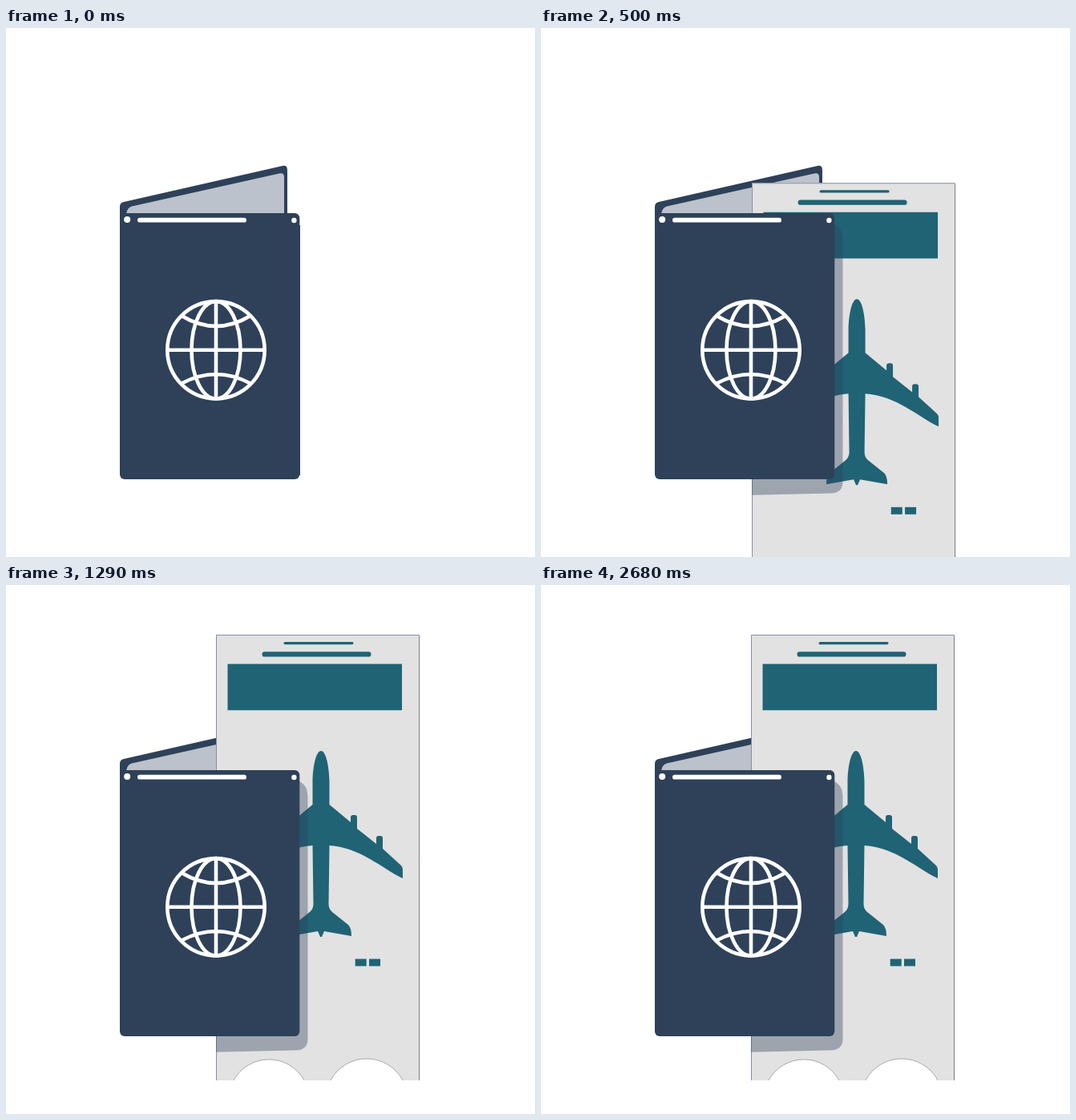
These frames come from a looping animation (660 px wide and 660 px high, 2720 ms). An HTML page with a canvas:

```html
<!DOCTYPE html>
<html lang="en">
<head>
<meta charset="utf-8">
<title>Passport and boarding pass</title>
<style>
  html, body { margin: 0; width: 100%; height: 100%; overflow: hidden; background: #fff; }
  canvas { display: block; width: 660px; height: 660px; }
</style>
</head>
<body>
<canvas id="stage" width="660" height="660"></canvas>
<script>
const ctx = document.getElementById('stage').getContext('2d');
const NAVY = '#2e4159', PAGE = '#bbc2cb', PAPER = '#e2e2e2', TEAL = '#206375';
const SHADOW = 'rgba(46,65,89,.38)';
const LOOP = 2720, STEP = LOOP / 76, LAST_MOVE = 18;

const fillPath = (d, color) => {
  ctx.fillStyle = color;
  ctx.fill(new Path2D(d));
};

const strokePath = (d, color, width) => {
  ctx.strokeStyle = color;
  ctx.lineWidth = width;
  ctx.stroke(new Path2D(d));
};

const box = (x, y, w, h, color, r = 0) => {
  ctx.fillStyle = color;
  ctx.beginPath();
  ctx.roundRect(x, y, w, h, r);
  ctx.fill();
};

const dot = (x, y, r, color) => {
  ctx.fillStyle = color;
  ctx.beginPath();
  ctx.arc(x, y, r, 0, Math.PI * 2);
  ctx.fill();
};

const ticketOutline = 'M262 62H516V618H495A51 51 0 0 0 405 618H372A50.2 50.2 0 0 0 284 618H262Z';

// Right half of the plane, measured from its centre line.
const halfPlane = 'M0 207C6 207 10 225 10.5 245V274L37 296V290Q37 287 40 287H42Q45 287 45 290V304' +
  'L69 323V316Q69 313 72 313H74Q77 313 77 316V329L100 350Q102 352 102 355V366' +
  'C75 353 50 328 10.5 325L9.5 398Q9.5 404 14 408L34 424Q38 428 38 438L4 432L1 439H0Z';

function drawBackCover() {
  fillPath('M142 240V223Q142 218 147 217L345 172Q351 171 351 177V240Z', NAVY);
  fillPath('M150 232Q151 224 157 222.5L341 181.5Q347 180 347 186V232Z', PAGE);
  box(365, 246, 2, 312, NAVY);
}

function drawPlane() {
  for (const side of [1, -1]) {
    ctx.save();
    ctx.translate(393, 0);
    ctx.scale(side, 1);
    fillPath(halfPlane, TEAL);
    ctx.restore();
  }
  box(392, 208, 2, 228, TEAL);
}

function drawTicket(dx, dy) {
  ctx.save();
  ctx.translate(dx, dy);
  fillPath(ticketOutline, PAPER);
  strokePath('M262.5 618V62.5H515.5', '#8390a6', 1);
  strokePath('M515.5 63V618', '#777c85', 1);
  strokePath('M495 618A51 51 0 0 0 405 618M372 618A50.2 50.2 0 0 0 284 618', '#999', 0.8);
  box(346.5, 71, 87, 3.2, TEAL, 1.6);
  box(319.5, 83.3, 136, 6.2, TEAL, 3.1);
  box(276.5, 98.5, 217.5, 57.8, TEAL);
  drawPlane();
  box(435.7, 466.5, 14, 9, TEAL);
  box(453, 466.5, 14, 9, TEAL);
  ctx.clip(new Path2D(ticketOutline));
  ctx.translate(-dx, -dy);
  fillPath('M366 245Q376 250 376.5 262V567Q376 580 362 580.5L255 583V560H366Z', SHADOW);
  ctx.restore();
}

function drawGlobe() {
  ctx.strokeStyle = '#fff';
  ctx.lineWidth = 4.6;
  for (const rx of [60.7, 30.5]) {
    ctx.beginPath();
    ctx.ellipse(262, 401.8, rx, 60.7, 0, 0, Math.PI * 2);
    ctx.stroke();
  }
  strokePath('M201 401.8H323M262 341V463M219 359Q262 385 305 359M219 443.5Q262 420.5 305 443.5', '#fff', 4.6);
}

function drawFrontCover() {
  box(142, 231, 224.3, 332, NAVY, [0, 6, 6, 6]);
  dot(151.2, 239, 4, '#fff');
  dot(359.4, 240, 3.2, '#fff');
  box(164, 236.8, 136, 5.8, '#fff', 2.9);
  drawGlobe();
}

// Steps start on multiples of 10 ms.
function stepAt(time) {
  let n = Math.floor(time / STEP) + 1;
  while (n > 0 && Math.round(n * STEP / 10) * 10 > time + 0.01) n--;
  return n;
}

function render(time) {
  const n = stepAt(time % LOOP);
  const left = Math.max(0, LAST_MOVE - n);
  ctx.fillStyle = '#fff';
  ctx.fillRect(0, 0, 660, 660);
  drawBackCover();
  if (n > 0) drawTicket(left * 0.27, left * 32.82);
  drawFrontCover();
}

let start;
function tick(now) {
  start ??= now;
  render(Math.max(0, now - start));
  requestAnimationFrame(tick);
}
render(0);
requestAnimationFrame(tick);
</script>
</body>
</html>
```
